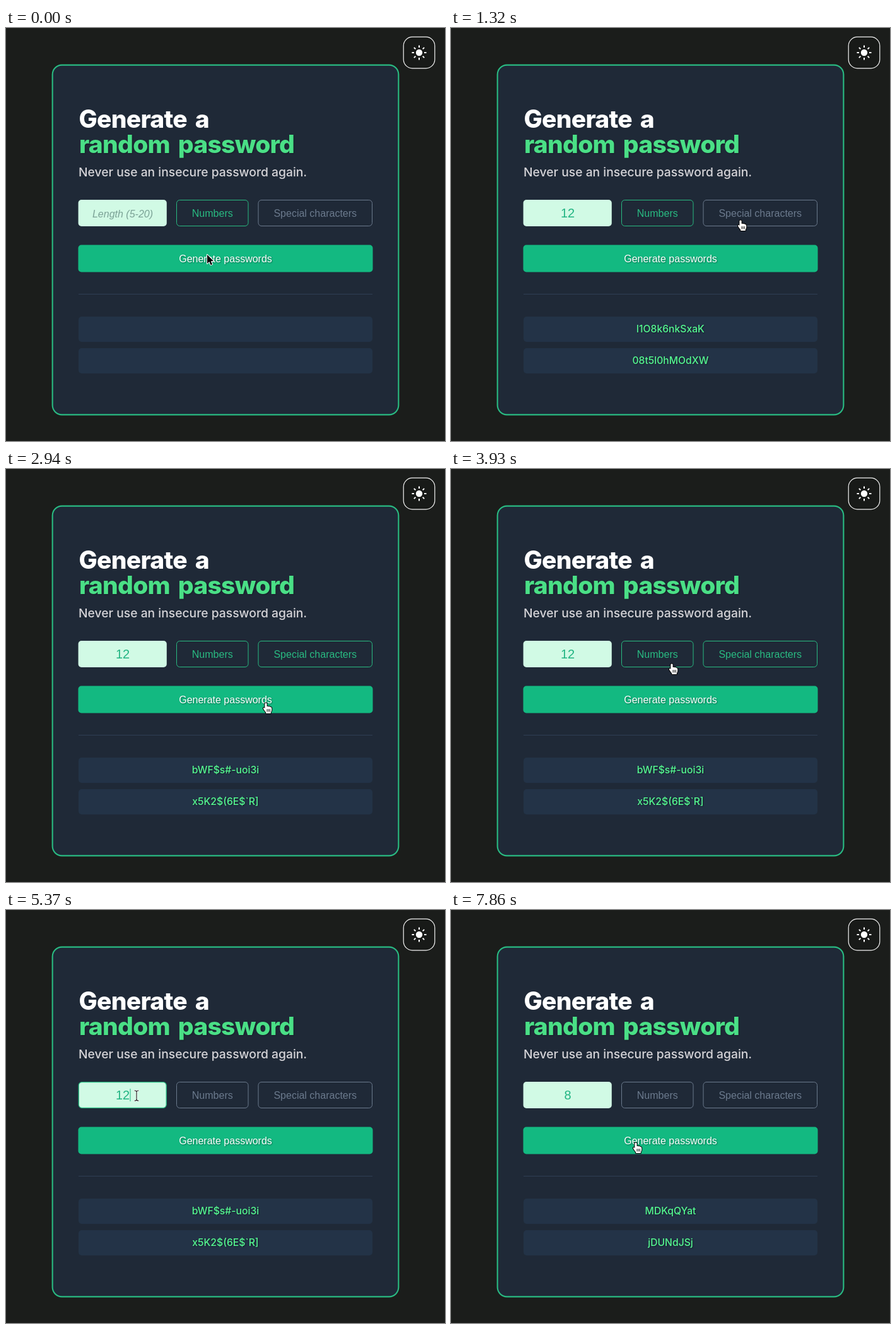
Animation of 696x654 px, one loop 8000 ms. Source, as an HTML page with a canvas:

```html
<!DOCTYPE html>
<html lang="en">
<head>
<meta charset="utf-8">
<title>Password generator</title>
<style>
  html, body { margin: 0; width: 100%; height: 100%; overflow: hidden; background: #1b1d1b; }
  canvas { display: block; width: 696px; height: 654px; }
</style>
</head>
<body>
<canvas id="stage" width="696" height="654"></canvas>
<script>
const ctx = document.getElementById('stage').getContext('2d');
const LOOP = 8000;
const INTER = 'Inter, sans-serif';
const ARIAL = '"Liberation Sans", Arial, sans-serif';
const GREEN = '#29bb82', GREY = '#6b7a8d', MINT = '#d1fae5';

// Pointer tip: time, x, y
const PATH = [
  [0, 319, 359], [210, 319, 359], [600, 320, 363], [750, 320, 363],
  [1080, 457, 309], [1230, 457, 309], [1320, 459, 305], [1500, 461, 302],
  [2080, 461, 302], [2220, 436, 310], [2640, 412, 371], [3670, 412, 371],
  [3930, 350, 309], [4050, 350, 306], [4290, 450, 306], [4400, 455, 305],
  [4500, 450, 312], [4620, 411, 349], [4760, 365, 361], [5040, 250, 325],
  [5280, 207, 294], [5560, 207, 294], [5850, 170, 294], [7120, 170, 294],
  [7620, 293, 369], [8000, 293, 369]
];

const RESULTS = [
  [7740, 'MDKqQYat', 'jDUNdJSj'],
  [2850, 'bWF$s#-uoi3i', 'x5K2$(6E$`R]'],
  [330, 'l1O8k6nkSxaK', '08t5l0hMOdXW']
];

const FIELD = [114.6, 272, 140.2, 42];
const NUMBERS = [270, 272, 114.5, 42];
const SPECIAL = [399.5, 272, 181.5, 42];
const SUBMIT = [114.5, 343.6, 467, 42.8];

const HAND = new Path2D('M-1.6 8V.8Q-1.6-.6 0-.6Q1.6-.6 1.6.8V5Q3 4.2 4.4 5.3Q6 4.6 7 6Q9.2 5.8 9.2 8V10.5Q9 13 7.8 14V16H.2V14.5Q-2 12-3.8 9Q-4.6 7.4-3.4 7Q-2.3 6.8-1.6 8Z');
const FINGERS = new Path2D('M2 9.5V13M4.2 9.5V13M6.4 9.5V13');
const ARROW = new Path2D('M0 0V14L3.3 11L5.6 16.2L8 15.2L5.8 10.2L10 10Z');
const BEAM = new Path2D('M-3-8Q0-8 0-6Q0-8 3-8M0-6V6M-3 8Q0 8 0 6Q0 8 3 8');

const during = (t, a, b) => t >= a && t < b;
const inside = ([x, y], [bx, by, w, h]) => x >= bx && x <= bx + w && y >= by && y <= by + h;

function slope(i, k) {
  const a = PATH[i - 1], p = PATH[i], b = PATH[i + 1];
  if (!a || !b) return 0;
  const before = p[k] - a[k], after = b[k] - p[k];
  return before * after <= 0 ? 0 : (b[k] - a[k]) / (b[0] - a[0]);
}

// Cubic path through the keys, at rest wherever the pointer stops or turns
function pointerAt(t) {
  let i = 0;
  while (i < PATH.length - 2 && t >= PATH[i + 1][0]) i++;
  const a = PATH[i], b = PATH[i + 1], d = b[0] - a[0], u = (t - a[0]) / d;
  return [1, 2].map(k =>
    a[k] + (b[k] - a[k]) * u * u * (3 - 2 * u) +
    d * u * (1 - u) * (slope(i, k) * (1 - u) - slope(i + 1, k) * u));
}

function box([x, y, w, h], r, fill, stroke, width = 1) {
  const inset = stroke ? width / 2 : 0;
  ctx.beginPath();
  ctx.roundRect(x + inset, y + inset, w - 2 * inset, h - 2 * inset, r);
  if (fill) { ctx.fillStyle = fill; ctx.fill(); }
  if (stroke) { ctx.strokeStyle = stroke; ctx.lineWidth = width; ctx.stroke(); }
}

function label(str, x, y, font, color, { align = 'center', shadow = 0, spacing = 0, gap = 0 } = {}) {
  ctx.save();
  ctx.font = font;
  ctx.textAlign = align;
  ctx.letterSpacing = spacing + 'px';
  ctx.wordSpacing = gap + 'px';
  ctx.fillStyle = color;
  if (shadow) {
    ctx.shadowColor = `rgba(0, 0, 0, ${shadow})`;
    ctx.shadowOffsetX = ctx.shadowOffsetY = 1;
    ctx.shadowBlur = 2;
  }
  ctx.fillText(str, x, y);
  ctx.restore();
}

function drawSun() {
  box([629.6, 13.6, 50.8, 50.8], 14, '#181a18', '#f4f4f4', 1.2);
  ctx.save();
  ctx.translate(655, 39);
  ctx.fillStyle = ctx.strokeStyle = '#fff';
  ctx.lineWidth = 2;
  ctx.beginPath();
  ctx.arc(0, 0, 5.2, 0, Math.PI * 2);
  ctx.fill();
  for (let i = 0; i < 8; i++) {
    ctx.beginPath();
    ctx.moveTo(0, 8);
    ctx.lineTo(0, 11.5);
    ctx.stroke();
    ctx.rotate(Math.PI / 4);
  }
  ctx.restore();
}

function drawCard() {
  box([72.6, 57.6, 550.8, 555.8], 15, '#1f2937', GREEN, 2.1);
  const heading = '800 39px ' + INTER;
  const style = { align: 'left', spacing: -0.75, gap: 5 };
  label('Generate a', 115.5, 158, heading, '#fff', style);
  label('random password', 116, 198, heading, '#4adf86', { ...style, shadow: 0.3 });
  label('Never use an insecure password again.', 115, 235, '450 19.3px ' + INTER, '#d5d4d8', { align: 'left' });
  ctx.fillStyle = '#2f3e53';
  ctx.fillRect(115, 421, 466, 1);
}

function drawField(t) {
  const focused = during(t, 5250, 7740);
  const value = t < 330 ? '' : t < 6810 ? '12' : '8';
  box(FIELD, 5, MINT, focused && GREEN, 1.3);
  if (!value) {
    label('Length (5-20)', 185, 300, 'italic 16px ' + ARIAL, '#7ba296');
    return;
  }
  if (during(t, 5580, 6810)) {
    const start = 196 - 22 * Math.min(1, (t - 5550) / 210);
    ctx.fillStyle = '#9bd0e8';
    ctx.fillRect(start, 281, 196 - start, 24);
  }
  label(value, 185, 300, '20px ' + ARIAL, '#22b583');
  const caret = during(t, 5280, 5580) ? 196.5 : during(t, 6810, 7310) ? 191 : 0;
  if (caret) {
    ctx.fillStyle = '#22b583';
    ctx.fillRect(caret, 283, 1, 20);
  }
}

function drawToggle(area, name, on) {
  const color = on ? GREEN : GREY;
  box(area, 5, null, color, 1);
  label(name, area[0] + area[2] / 2, 298.7, '16px ' + ARIAL, color);
}

function drawResults(t) {
  const shown = RESULTS.find(r => t >= r[0]);
  for (const i of [0, 1]) {
    const y = 457 + i * 50;
    box([115, y, 466, 40], 5, '#233347');
    if (shown) label(shown[i + 1], 348, y + 25.4, '500 15.7px ' + INTER, '#55f991', { shadow: 0.4 });
  }
}

function outlined(path, fill, stroke, width) {
  ctx.lineWidth = width;
  ctx.strokeStyle = stroke;
  ctx.stroke(path);
  ctx.fillStyle = fill;
  ctx.fill(path);
}

function drawPointer(t) {
  if (during(t, 6780, 7140)) return;
  const p = pointerAt(t);
  ctx.save();
  ctx.translate(...p);
  ctx.lineJoin = ctx.lineCap = 'round';
  if (inside(p, FIELD)) {
    for (const [color, width] of [['#fff', 2.6], ['#111', 1.1]]) {
      ctx.strokeStyle = color;
      ctx.lineWidth = width;
      ctx.stroke(BEAM);
    }
  } else if (t >= 240 && [NUMBERS, SPECIAL, SUBMIT].some(b => inside(p, b))) {
    outlined(HAND, '#fff', '#000', 2);
    ctx.lineWidth = 0.9;
    ctx.stroke(FINGERS);
  } else {
    outlined(ARROW, '#000', '#fff', 2);
  }
  ctx.restore();
}

function draw(t) {
  ctx.fillStyle = '#1b1d1b';
  ctx.fillRect(0, 0, 696, 654);
  drawSun();
  drawCard();
  drawField(t);
  drawToggle(NUMBERS, 'Numbers', t < 4050);
  drawToggle(SPECIAL, 'Special characters', during(t, 1680, 4380));
  box(SUBMIT, 5, '#13b981');
  label('Generate passwords', 348, 371, '16px ' + ARIAL, '#fff', { shadow: 0.4 });
  drawResults(t);
  drawPointer(t);
}

const start = performance.now();
function tick() {
  const t = (performance.now() - start) % LOOP;
  draw(Math.floor(t / 30) * 30);
  requestAnimationFrame(tick);
}
tick();
</script>
</body>
</html>
```
